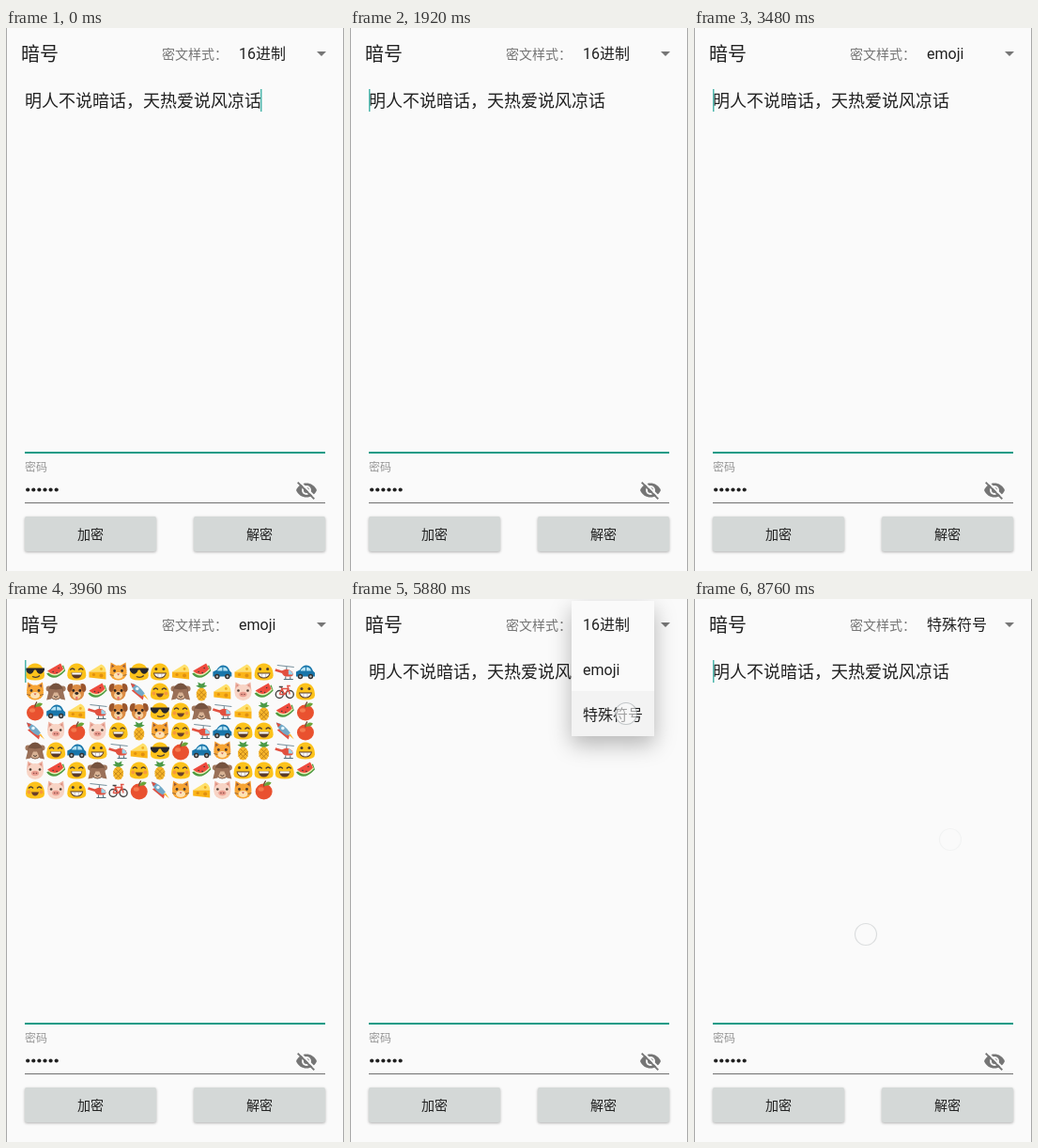
Animation, 360 px wide and 578 px high, one loop 8.88 s. Source, as an HTML page with a canvas:

```html
<!DOCTYPE html>
<html lang="zh-CN">
<head>
<meta charset="utf-8">
<title>暗号</title>
<style>
html, body { margin: 0; width: 100%; height: 100%; overflow: hidden; background: #fafafa; }
canvas { display: block; width: 360px; height: 578px; }
</style>
</head>
<body>
<canvas lang="zh-CN"></canvas>
<script>
const LOOP = 8880, STEP = 120;
const INK = '#212121', GREY = '#757575', PAPER = '#fafafa';
const PLAIN = '明人不说暗话，天热爱说风凉话';
const MODES = ['16进制', 'emoji', '特殊符号'];

// One cipher text, shown in three alphabets of sixteen signs.
const LINES = [
  '%<*([%&(<^(&|^[?@<@_#?)(]<+&=^(|@@',
  '%#?|()<=_]=]*)[#|^**_=?*^&|(%=^[))|',
  '&]<*?)#)#<?&**<#]&|+=_[(][='
];
const CIPHER = LINES.join('');
const SIGNS = '%<*([&^|?@_#)]+=';
const HEX = [...CIPHER].map(c => SIGNS.indexOf(c).toString(16).toUpperCase()).join('');

// Cipher text is visible in these spans; its mode is the span's index.
const ENCODED = [[720, 1560], [3720, 4680], [6600, 7480]];
const MENUS = [
  { open: 2290, close: 2860, end: 3000, row: 1 },
  { open: 5410, close: 5970, end: 6110, row: 2 }
];
const BLINK_STARTS = [0, ...ENCODED.flat(), ...MENUS.map(m => m.end)].sort((a, b) => a - b);
const TOUCHES = [
  [110, 538, 530, 720], [270, 538, 1370, 1560],
  [290, 28, 2150, 2280], [285, 75, 2640, 2850],
  [105, 538, 3530, 3720], [279, 536, 4420, 4680],
  [288, 28, 5270, 5400], [294, 122, 5750, 5960],
  [102, 538, 6420, 6600], [262, 543, 7290, 7480],
  [273, 256, 8510, 8640], [183, 357, 8630, 8700]
].map(([x, y, from, to]) => ({ x, y, from, to }));

const canvas = document.querySelector('canvas');
const g = canvas.getContext('2d');
const ratio = window.devicePixelRatio || 1;
canvas.width = 360 * ratio;
canvas.height = 578 * ratio;

const clamp = v => Math.max(0, Math.min(1, v));
const within = (t, a, b) => t >= a && t < b;

function text(s, x, y, size, color = INK, align = 'left', weight = 400) {
  g.font = `${weight} ${size}px Roboto, "Noto Sans CJK SC", "Noto Sans CJK", sans-serif`;
  g.textAlign = align;
  g.fillStyle = color;
  g.fillText(s, x, y);
}
function rect(x, y, w, h, color) {
  g.fillStyle = color;
  g.fillRect(x, y, w, h);
}
function oval(x, y, rx, ry, color) {
  g.fillStyle = color;
  g.beginPath();
  g.ellipse(x, y, rx, ry, 0, 0, Math.PI * 2);
  g.fill();
}
const dot = (x, y, r, color) => oval(x, y, r, r, color);
const pair = (x, y, r, color) => { dot(-x, y, r, color); dot(x, y, r, color); };
function fill(d, color) {
  g.fillStyle = color;
  g.fill(new Path2D(d));
}
function stroke(d, color, width = 1) {
  g.strokeStyle = color;
  g.lineWidth = width;
  g.stroke(new Path2D(d));
}
function shadow(color, blur, dy) {
  g.shadowColor = color;
  g.shadowBlur = blur * ratio;
  g.shadowOffsetY = dy * ratio;
}

// Emoji, each drawn around the origin in a box about 20 px wide.
const DARK = '#4a3b32';
const blob = () => fill('M-10 4C-10-4-6-9 0-9S10-4 10 4Q10 9 0 9T-10 4Z', '#fcc21b');
const ears = (color, inner) => {
  fill('M-9 0L-8-10L-1-6ZM9 0L8-10L1-6Z', color);
  fill('M-7-3L-7-8L-3-5ZM7-3L7-8L3-5Z', inner);
};
const happyEyes = () => stroke('M-7-2Q-4.5-5-2-2M2-2Q4.5-5 7-2', DARK, 1.3);
const EMOJI = {
  '%'() {
    blob();
    fill('M-10-4H10V-2Q8 3 4 2Q2 1 1-2H-1Q-2 1-4 2Q-8 3-10-2Z', '#26262c');
    stroke('M-3 5Q2 7 5 4', DARK, 1.2);
  },
  '<'() {
    fill('M-10 2Q-2 12 10-1L8-7Z', '#4c9a3f');
    fill('M-9 0Q-1 9 9-2L6-8Z', '#e8efb6');
    fill('M-9-1Q-1 7 8-3L5-9Z', '#ee4b3e');
    dot(-3, 0, .8, DARK); dot(1, 1, .8, DARK); dot(3, -4, .8, DARK);
  },
  '*'() {
    blob();
    happyEyes();
    fill('M-6 1H6Q5 7 0 7T-6 1Z', '#5b3b28');
    rect(-5, 1, 10, 2, '#fff');
  },
  '('() {
    fill('M-9 0L4-8Q9-6 9 0Z', '#ffe06a');
    fill('M-9 0H9V8L-9 6Z', '#fbb418');
    dot(-4, 3, 1.6, '#e08f10'); dot(4, 4, 2, '#e08f10'); dot(4, -3, 1.4, '#eeb023');
  },
  '['() {
    ears('#f39a2e', '#8a5540');
    oval(0, 1, 9, 8, '#f7a535');
    oval(0, 4, 5, 3.5, '#fde3b5');
    pair(4, -1, 1.4, DARK);
    fill('M-1.5 2H1.5L0 4Z', '#d05a50');
    stroke('M-9 3L-5 4M9 3L5 4', '#6d4c33', .7);
  },
  '&'() {
    blob();
    pair(4, -3, 1.5, DARK);
    fill('M-7 1H7Q6 7 0 7T-7 1Z', '#5b3b28');
    fill('M-6 2H6Q4 6 0 6T-6 2Z', '#fff');
    stroke('M-2 2V6M2 2V6', '#9b8b7b', .5);
  },
  '^'() {
    fill('M-10 5V0L-6-2Q-3-7 1-7Q6-7 8-1L10 1V5Z', '#1976aa');
    fill('M-5-2Q-3-5 0-5V-1H-5ZM1-5Q5-5 6-1H1Z', '#b8e4f5');
    pair(5.5, 5, 2.7, '#333');
    pair(5.5, 5, 1.2, '#bbb');
  },
  '|'() {
    stroke('M-8-7L10-5M2-6V-2', '#78909c', 1.2);
    stroke('M-10-2L0 1', '#e2503f', 2.5);
    fill('M-3-1Q3-5 8 0Q11 5 5 5H1Q-3 4-3-1Z', '#e2503f');
    fill('M4-2Q8-1 9 3H4Z', '#9bd8ee');
    stroke('M-1 8H9M1 5V8M6 5V8', '#546e7a', 1);
  },
  '?'() {
    pair(7.5, -3, 3, '#a1785e');
    oval(0, 0, 8, 9, '#76533f');
    oval(0, 4, 5, 4, '#d8b294');
    fill('M-10 9L-7-3L0-2L7-3L10 9L5 8L2 1H-2L-5 8Z', '#9a7058');
    stroke('M-2 5Q0 7 2 5', DARK, 1);
  },
  '@'() {
    oval(0, 1, 8, 8.5, '#dc8c43');
    fill('M-4-8Q-10-10-10-2Q-8 3-5-2ZM4-8Q10-10 10-2Q8 3 5-2Z', '#9a552c');
    oval(0, 4, 4.5, 4, '#f6cf9d');
    pair(3.5, -1, 1.4, '#302622');
    oval(0, 2, 2, 1.4, '#302622');
    oval(0, 7, 1.3, 1.8, '#e9756c');
  },
  '_'() {
    fill('M-8-1L-3-4L5 5L4 9Z', '#df5143');
    fill('M-9-9Q-1-8 6 2L3 5Q-7 0-9-9Z', '#72a9c7');
    fill('M-9-9L-4-7L-7-4Z', '#df5143');
    dot(-2, -3, 1.8, '#e6f5fb');
    fill('M4 4L6 3L10 9Z', '#fbb52b');
  },
  '#'() {
    blob();
    happyEyes();
    pair(6.5, 2, 2, '#f79a3a');
    fill('M-4 2H4Q3 6 0 6T-4 2Z', '#6b3f2a');
  },
  ')'() {
    fill('M0-3L-6-6L-3-7L-4-10L0-8L4-10L3-7L6-6Z', '#4b9a48');
    oval(0, 3, 5.5, 7, '#f6b62a');
    stroke('M-5 1L3 9M-3-2L5 6M5 1L-3 9M3-2L-5 6', '#b97b1a', .8);
  },
  ']'() {
    ears('#efb5a4', '#d98d80');
    oval(0, 1, 9, 8.5, '#f8d4c5');
    pair(5, -1, 1.3, DARK);
    oval(0, 3, 4, 2.8, '#e99d90');
    pair(1.4, 3, .8, '#8b4b45');
  },
  '+'() {
    for (const x of [-5.5, 5.5]) {
      g.strokeStyle = '#454545';
      g.lineWidth = 1.4;
      g.beginPath();
      g.arc(x, 3, 4, 0, 7);
      g.stroke();
    }
    stroke('M-5.5 3L-3-3H4L0 3H-5.5M0 3L-4-5M5.5 3L3-6H6', '#df5143', 1.3);
    stroke('M-6-5H-2', '#444', 1.5);
  },
  '='() {
    oval(0, 1.5, 9, 8.5, '#e9512f');
    oval(-3, -1, 3, 2.2, '#f47a4f');
    stroke('M0-4Q0-8 2-10', '#6d4830', 1.3);
    fill('M0-5Q3-11 8-8Q6-4 0-5Z', '#6ba53b');
  }
};

function drawCipher(mode) {
  if (mode === 0) {
    for (let i = 0; i * 31 < HEX.length; i++) text(HEX.slice(i * 31, i * 31 + 31), 20, 84 + i * 21, 18);
  } else if (mode === 2) {
    LINES.forEach((line, i) => text(line, 20, 84 + i * 21, 18));
  } else {
    [...CIPHER].forEach((sign, i) => {
      g.save();
      g.translate(31 + i % 14 * 22.15, 77.5 + Math.floor(i / 14) * 21);
      EMOJI[sign]();
      g.restore();
    });
  }
}

function drawButton(label, x, t) {
  const pressed = TOUCHES.some(p => p.y > 500 && p.x > x && p.x < x + 140 && within(t, p.from + 60, p.to + 120));
  g.save();
  shadow(pressed ? 'rgba(0,0,0,.36)' : 'rgba(0,0,0,.3)', pressed ? 7 : 3, pressed ? 3 : 1);
  g.fillStyle = pressed ? '#d2d6d5' : '#d4d8d7';
  g.beginPath();
  g.roundRect(x, 520, 140, 37, 2);
  g.fill();
  g.restore();
  text(label, x + 70, 543.5, 14, INK, 'center', 500);
}

function drawHiddenEye() {
  g.save();
  g.translate(320, 492);
  fill('M-11 0C-7-10 7-10 11 0C7 10-7 10-11 0Z', GREY);
  dot(0, 0, 5, PAPER);
  dot(0, 0, 3, GREY);
  stroke('M-8-10L10 8', PAPER, 2);
  stroke('M-9.3-8.3L8.3 9.3', GREY, 1.9);
  g.restore();
}

function drawMenu(menu, t) {
  g.save();
  g.globalAlpha = Math.min(clamp((t - menu.open) / 140), clamp((menu.end - t) / (menu.end - menu.close)));
  g.save();
  shadow('rgba(0,0,0,.28)', 22, 9);
  rect(236, 2, 88, 144, PAPER);
  g.restore();
  if (t >= menu.close - 220) rect(236, 2 + menu.row * 48, 88, 48, '#f3f3f3');
  MODES.forEach((name, i) => text(name, 248, 33 + i * 48, 16));
  g.restore();
}

function drawTouch(p, t) {
  if (t < p.from) return;
  const alpha = 1 - clamp((t - p.to) / 140);
  if (!alpha) return;
  g.save();
  g.globalAlpha = alpha;
  dot(p.x, p.y, 11.5, 'rgba(250,250,250,.6)');
  g.strokeStyle = 'rgba(110,120,125,.38)';
  g.lineWidth = 1.2;
  g.beginPath();
  g.arc(p.x, p.y, 11.5, 0, 7);
  g.stroke();
  g.restore();
}

function draw(t) {
  g.setTransform(ratio, 0, 0, ratio, 0, 0);
  rect(0, 0, 360, 578, PAPER);
  rect(0, 0, 1, 578, '#a8a8a8');
  rect(359, 0, 1, 578, '#a8a8a8');

  const mode = MENUS.filter(m => t >= m.close).length;
  text('暗号', 16, 34.5, 20, INK, 'left', 500);
  text('密文样式：', 166, 32.5, 14, GREY);
  text(MODES[mode], 248, 33, 16);
  fill('M331 25H341L336 30Z', GREY);

  const encoded = ENCODED.findIndex(([a, b]) => within(t, a, b));
  if (encoded < 0) text(PLAIN, 20, 84, 18);
  else drawCipher(encoded);

  const menu = MENUS.find(m => within(t, m.open, m.end));
  const blinkStart = BLINK_STARTS.filter(s => s <= t).pop();
  if (!menu && (t - blinkStart) % 1000 < 500) {
    rect(t < ENCODED[0][0] ? 271 : 20, 65, 1.5, 24, '#4db6ac');
  }

  rect(20, 451, 320, 2, '#159b87');
  text('密码', 20, 471.5, 12, '#969696');
  for (let i = 0; i < 6; i++) dot(23.2 + i * 6.1, 491.5, 2.1, INK);
  drawHiddenEye();
  rect(20, 505, 320, 1, '#707070');
  drawButton('加密', 20, t);
  drawButton('解密', 200, t);

  if (menu) drawMenu(menu, t);
  TOUCHES.forEach(p => drawTouch(p, t));
}

const start = performance.now();
function tick() {
  const t = (performance.now() - start) % LOOP;
  draw(Math.floor(t / STEP) * STEP);
  requestAnimationFrame(tick);
}
tick();
</script>
</body>
</html>
```
